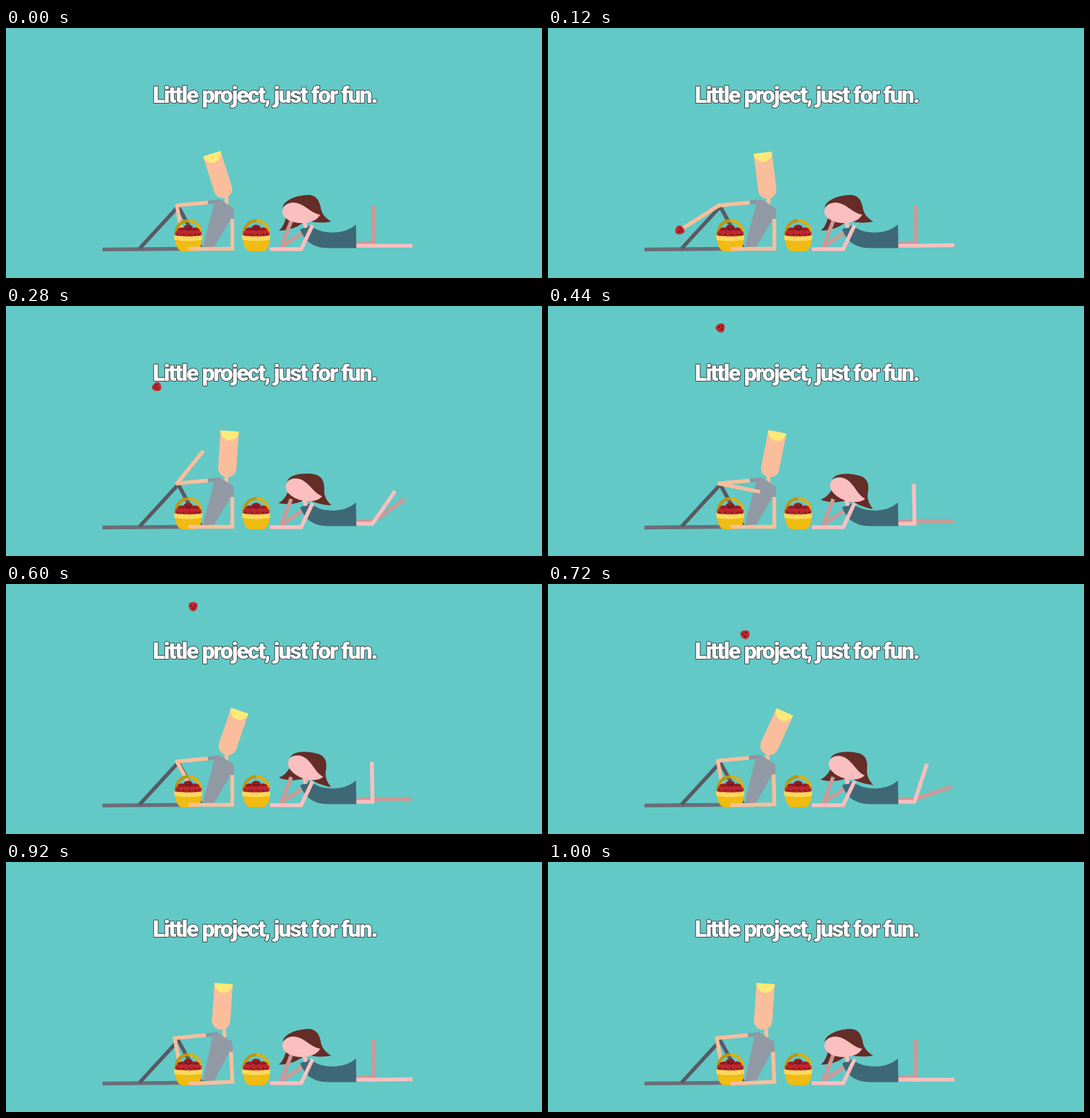
Write an HTML page that moves like this. It is 778 px wide and 364 px high and loops after 1040 ms.

```html
<!DOCTYPE html>
<html lang="en">
<head>
<meta charset="utf-8">
<title>Little project</title>
<style>
  html, body { margin: 0; width: 100%; height: 100%; overflow: hidden; background: #62c9c6; }
  svg { display: block; width: 778px; height: 364px; color: #c1272d; }
  .line { fill: none; stroke-width: 5.5; }
  .skin { stroke: #fabe9c; }
  .pink { stroke: #fcbfc0; }
  .rose { stroke: #cf9896; }
  .dark { color: #941d27; }
  .title { font: 900 33px Roboto, "Liberation Sans", sans-serif; fill: #fff; stroke: #3c4648;
    stroke-width: 2; stroke-linejoin: round; paint-order: stroke; text-anchor: middle; }
</style>
</head>
<body>
<svg viewBox="0 0 778 364">
  <defs>
    <g id="berry">
      <path d="M-6.5-2C-6.5-8 6.5-8 6.5-2C6.5 3 3 7 0 7S-6.5 3-6.5-2Z" fill="currentColor"/>
      <g fill="#3a0c10">
        <circle cx="-2.6" cy="-.5" r="1.1"/><circle cx="2.6" cy="-.5" r="1.1"/>
        <circle cx="0" cy="2.6" r="1"/>
      </g>
    </g>
    <g id="basket">
      <g fill="none" stroke-width="4.5">
        <path d="M0 280.500A18 18 0 0 1 18 298V304" stroke="#deb00f"/>
        <path d="M-17.500 304V298A18 18 0 0 1 .5 280.500" stroke="#bd960f"/>
      </g>
      <path d="M-17 305V297H18V305Z" fill="#8c1c24"/>
      <g class="dark">
        <use href="#berry" y="293"/>
        <use href="#berry" x="-9.500" y="297"/><use href="#berry" x="10" y="297"/>
      </g>
      <use href="#berry" x="-12.500" y="301"/><use href="#berry" x="-4" y="301"/>
      <use href="#berry" x="4.500" y="301"/><use href="#berry" x="13" y="301"/>
      <path d="M-19 304H20C20 317 16 325 9 325H-8C-15 325-19 317-19 304Z" fill="#f0bb13"/>
      <path d="M-20.5 302Q0 305 20.5 302L20 308.500Q0 312-20 308.500Z" fill="#fbd95c"/>
    </g>
  </defs>

  <text class="title" x="375.500" y="108.500">Little project, just for fun.</text>

  <!-- man -->
  <path class="line" d="M140 322.500L296 321" stroke="#6a6d78"/>
  <path class="line" d="M194 321L250 260L283 320" stroke="#585a62"/>
  <use id="ball" href="#berry"/>
  <g id="upperArm">
    <path class="line skin" d="M247 258.500L294 254"/>
    <path class="line" d="M293 254L311 252.500" stroke="#8c94a1" stroke-width="6"/>
  </g>
  <g class="body">
    <path class="line skin" d="M320 243V259"/>
    <path d="M303 253L311 250L331 263V278.500H326L301 320.500L286 317Z" fill="#9199a4"/>
  </g>
  <g id="head">
    <path d="M-13.300-64H13.300V-10A13.300 13.300 0 0 1-13.300-10Z" fill="#fabe9c"/>
    <path d="M-13.300-64H13.300A13.300 13.300 0 0 1-13.300-64Z" fill="#fdea78"/>
  </g>
  <path id="forearm" class="line skin" d="M-2 0H61"/>
  <use href="#basket" x="264.500"/>
  <path class="line skin body" d="M328.500 278V321.500H265"/>
  <use href="#basket" x="363"/>

  <!-- woman -->
  <path class="line rose" d="M509 313H536"/>
  <path id="backLeg" class="line rose" d="M-2.500 0H55"/>
  <path class="line pink" d="M508 317H533"/>
  <path id="frontLeg" class="line pink" d="M-2.500 0H58"/>
  <path class="nod" fill="#652d27"
    d="M407 270C406 282 402 290 396 295C411 295 424 290 436 280C446 284 460 284 472 282C463 276 458 271 456 258Z"/>
  <path class="line rose" d="M432 297L400 318L414 281"/>
  <path d="M427 293L442 287C454 300 490 303 508 286L508.500 320.500H468C447 320 434 312 427 293Z" fill="#3f6876"/>
  <path class="line pink" d="M432 276L435 291" stroke-width="7"/>
  <g class="nod">
    <ellipse cx="429" cy="267.500" rx="28" ry="16.500" fill="#fcbfc0"/>
    <path d="M401.500 262C402 251 422 243 440 243C452 244 457 253 457.500 272C445 271 438 261 426 256C416 252 406 255 401.500 262Z" fill="#652d27"/>
  </g>
  <path class="line pink" d="M383 322H428.500L445 287"/>
</svg>
<script>
const LOOP = 1040, STEP = 40, RELEASE = 200, PEAK = 520, CATCH = 920;
const all = s => document.querySelectorAll(s);
const $ = id => document.getElementById(id);

const ramp = (t, a, b) => Math.min(1, Math.max(0, (t - a) / (b - a)));
const easeOut = (p, k) => 1 - (1 - p) ** k;
const smooth = p => p * p * (3 - 2 * p);
const mix = (a, b, p) => a + (b - a) * p;

function place(el, x, y, turn = 0) {
  el.setAttribute('transform', `translate(${x} ${y}) rotate(${turn})`);
}

function turnAbout(els, angle, x, y) {
  for (const el of els) el.setAttribute('transform', `rotate(${angle} ${x} ${y})`);
}

// fast rise to the peak, then a free fall
function flight(t) {
  const up = ramp(t, RELEASE, PEAK), down = ramp(t, PEAK, CATCH);
  return t < PEAK
    ? [mix(201, 262, easeOut(up, 1.2)), mix(210, 25, easeOut(up, 2.4))]
    : [mix(262, 310, down), mix(25, 219, down ** 2)];
}

function drawMan(t) {
  const lean = ramp(t, 600, 840), aim = ramp(t, 0, RELEASE);
  const follow = ramp(t, RELEASE, 840), sink = ramp(t, 440, 840), recoil = ramp(t, 840, CATCH);
  const turn = 80 + 229 * ramp(t, 0, 280) ** 1.44 + 131 * easeOut(ramp(t, 280, 700), 1.35);
  const x = 248 - 3 * lean, y = 258.5 - 2 * lean;

  place($('upperArm'), -3 * lean, -2 * lean);
  place($('forearm'), x, y, turn);
  turnAbout(all('.body'), -2.5 * lean, 295, 320);
  place($('head'),
    318 + 2.5 * aim - 4.5 * sink - 4.5 * recoil,
    244 + 2 * aim - 2 * sink - 3 * recoil,
    -17.5 + 17.5 * aim + 30 * follow - 26 * recoil);

  const a = turn * Math.PI / 180;
  const held = [x + 67 * Math.cos(a), y + 67 * Math.sin(a)];
  place($('ball'), ...(t < RELEASE ? held : flight(t)), (t - RELEASE) * .9);
  $('ball').style.visibility = t > 0 && t < CATCH ? 'visible' : 'hidden';
}

function drawWoman(t) {
  const swing = 1 - Math.abs(t - PEAK) / PEAK;
  const kick = smooth(ramp(swing, .2, .79));
  place($('frontLeg'), 532, 317, -91 * kick);
  place($('backLeg'), 534, 313, 91 * (kick - 1));
  turnAbout(all('.nod'), 20 * kick, 433, 288);
}

const title = document.querySelector('.title');
title.style.letterSpacing = (325 - title.getComputedTextLength()) / title.textContent.length + 'px';

const start = performance.now();
function tick() {
  const now = (performance.now() - start) % LOOP;
  const t = Math.floor(now / STEP) * STEP;
  drawMan(t);
  drawWoman(t);
  requestAnimationFrame(tick);
}
tick();
</script>
</body>
</html>
```
